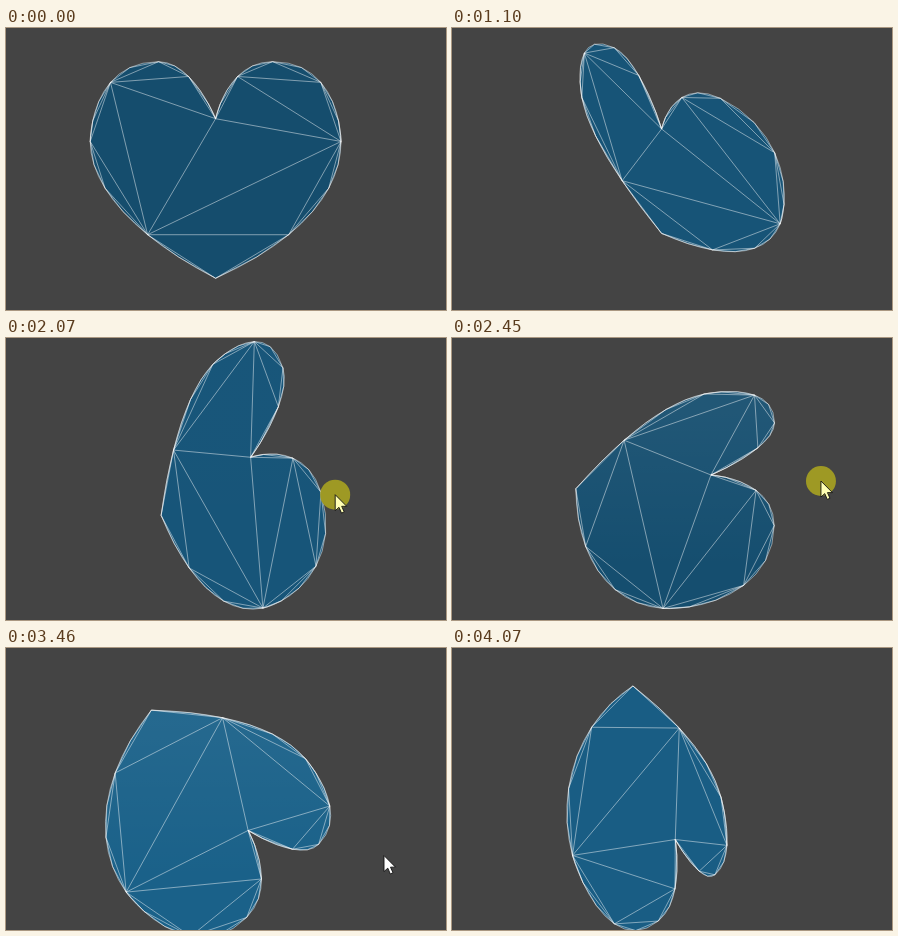
Recreate the animation shown at these times as an HTML page. Size 440 px wide and 282 px high, loop 4100 ms.

```html
<!DOCTYPE html>
<html lang="en">
<head>
<meta charset="utf-8">
<title>Rotating heart mesh</title>
<style>
  html, body { margin: 0; width: 100%; height: 100%; overflow: hidden; background: #444; }
  svg { display: block; width: 440px; height: 282px; }
</style>
</head>
<body>
<svg viewBox="0 0 440 282">
  <linearGradient id="shine" gradientUnits="userSpaceOnUse" x1="0" y1="75" x2="0" y2="230">
    <stop offset="0" stop-color="#fff"/>
    <stop offset="1" stop-color="#fff" stop-opacity="0"/>
  </linearGradient>
  <path id="face"/>
  <path id="sheen" fill="url(#shine)"/>
  <g id="wires" fill="none" stroke="#fff" stroke-opacity=".46" stroke-linejoin="round"></g>
  <g id="pointer">
    <circle id="press" r="15" fill="#9e9924"/>
    <path id="arrow" d="M0 0V16L3.8 12.6L6.3 18.4L9 17.2L6.5 11.6H11.5Z" stroke="#111" stroke-width=".9"/>
  </g>
</svg>
<script>
const LOOP = 4100;
const SPIN = 0.000702;            // radians per ms, about both x and y
const CENTER = { x: 209.6, y: 142 };
const SCALE = 11.4, DEPTH = 340;
const STEPS = 12;                 // segments per curve
const GRAB = 1680, RELEASE = 3430;
const POINTER = { from: 1500, to: 3740 };
const HOME = { x: 274, y: 190 };  // where the drag begins
const DEGREE = Math.PI / 180;

const clamp01 = u => Math.min(1, Math.max(0, u));
const progress = (t, from, to) => clamp01((t - from) / (to - from));
const smooth = u => u * u * (3 - 2 * u);
const sineOut = u => Math.sin(u * Math.PI / 2);

// Right half from cleft to tip; the two halves differ slightly
const half = (lobe, hip) => [
  [[0, 5], [0, 5], [lobe, 0], [5, 0]],
  [[5, 0], [11, 0], [11, 7], [11, 7]],
  [[11, 7], [11, 11], [hip, 15.4], [0, 19]]
];

const bezier = (p, t, axis) => {
  const s = 1 - t;
  return s * s * s * p[0][axis] + 3 * s * s * t * p[1][axis] +
         3 * s * t * t * p[2][axis] + t * t * t * p[3][axis];
};

const sample = (curves, side) => curves.flatMap(curve =>
  Array.from({ length: STEPS }, (_, i) => [
    side * bezier(curve, i / STEPS, 0) * SCALE,
    (bezier(curve, i / STEPS, 1) - 9.5) * SCALE,
    0
  ]));

const backwards = curves => curves.map(curve => [...curve].reverse()).reverse();
const vertices = [...sample(half(2, 7), -1), ...sample(backwards(half(1, 8)), 1)];

// Ear clipping leaves nested chord polygons and a few long diagonals
const STRIDES = [1, 2, 4, 8];
const DIAGONALS = [[2, 0], [2, 4], [4, 0], [4, 6], [0, 6], [6, 8]];

const rotateX = ([x, y, z], a) => {
  const c = Math.cos(a), s = Math.sin(a);
  return [x, y * c - z * s, y * s + z * c];
};
const rotateY = ([x, y, z], a) => {
  const c = Math.cos(a), s = Math.sin(a);
  return [x * c + z * s, y, z * c - x * s];
};
const spin = (p, angle) => rotateX(rotateY(p, -angle), -angle);

function project([x, y, z]) {
  const k = DEPTH / (DEPTH - z);
  return (CENTER.x + x * k).toFixed(2) + ' ' + (CENTER.y + y * k).toFixed(2);
}

// An arc to the right and up, swinging back down until the release
const swing = (t, duration) =>
  Math.sin(Math.PI * (Math.min(Math.max(t, GRAB), RELEASE) - GRAB) / duration);
const reach = t =>
  111 * sineOut(progress(t, GRAB, 2860)) - 7 * smooth(progress(t, 2950, RELEASE));

function pointerAt(t) {
  const before = 1 - smooth(progress(t, POINTER.from, 1630));
  const leaving = smooth(progress(t, 3560, 3720));
  return {
    x: HOME.x + reach(t) + 60 * before + 48 * leaving,
    y: HOME.y - 47 * swing(t, 1560) + 13 * before
  };
}

function faceColor(angle) {
  const [x, y, z] = spin([0, 0, 1], angle);
  const side = (x - 2 * y + z) / Math.sqrt(6);
  let light = Math.max(0, -y) + Math.abs(side);
  if (light > 0.5) light = 0.5 + 0.3 * (light - 0.5);
  const rgb = [10 + 26 * light, 38 + 96 * light, 53 + 137 * light].map(Math.round);
  return `rgb(${rgb})`;
}

const byId = id => document.getElementById(id);
const face = byId('face'), sheen = byId('sheen'), wires = byId('wires');
const pointer = byId('pointer'), press = byId('press'), arrow = byId('arrow');
const addWire = () =>
  wires.appendChild(document.createElementNS('http://www.w3.org/2000/svg', 'path'));
const rings = STRIDES.map(addWire);
const inner = addWire();

function draw(time) {
  const angle = SPIN * time;
  const yaw = 0.69 * DEGREE * reach(time);
  const tilt = 32.4 * DEGREE * swing(time, 1674);
  const points = vertices.map(v => project(rotateX(rotateY(spin(v, angle), yaw), tilt)));
  const ring = stride => 'M' + points.filter((_, i) => i % stride === 0).join('L') + 'Z';

  face.setAttribute('d', ring(1));
  face.setAttribute('fill', faceColor(angle));
  sheen.setAttribute('d', ring(1));
  sheen.setAttribute('opacity', 0.15 * Math.exp(-(((time - 2950) / 480) ** 2)));
  rings.forEach((path, i) => path.setAttribute('d', ring(STRIDES[i])));
  inner.setAttribute('d',
    DIAGONALS.map(([a, b]) => `M${points[a * 8]}L${points[b * 8]}`).join(''));

  const { x, y } = pointerAt(time);
  const shown = time >= POINTER.from && time < POINTER.to;
  const pressed = time > GRAB && time < RELEASE;
  pointer.style.display = shown ? '' : 'none';
  pointer.setAttribute('transform', `translate(${x.toFixed(2)} ${y.toFixed(2)})`);
  press.style.display = pressed ? '' : 'none';
  arrow.setAttribute('fill', pressed ? '#ffffb4' : '#fff');
}

const start = performance.now();
function tick() {
  draw((performance.now() - start) % LOOP);
  requestAnimationFrame(tick);
}
tick();
</script>
</body>
</html>
```
